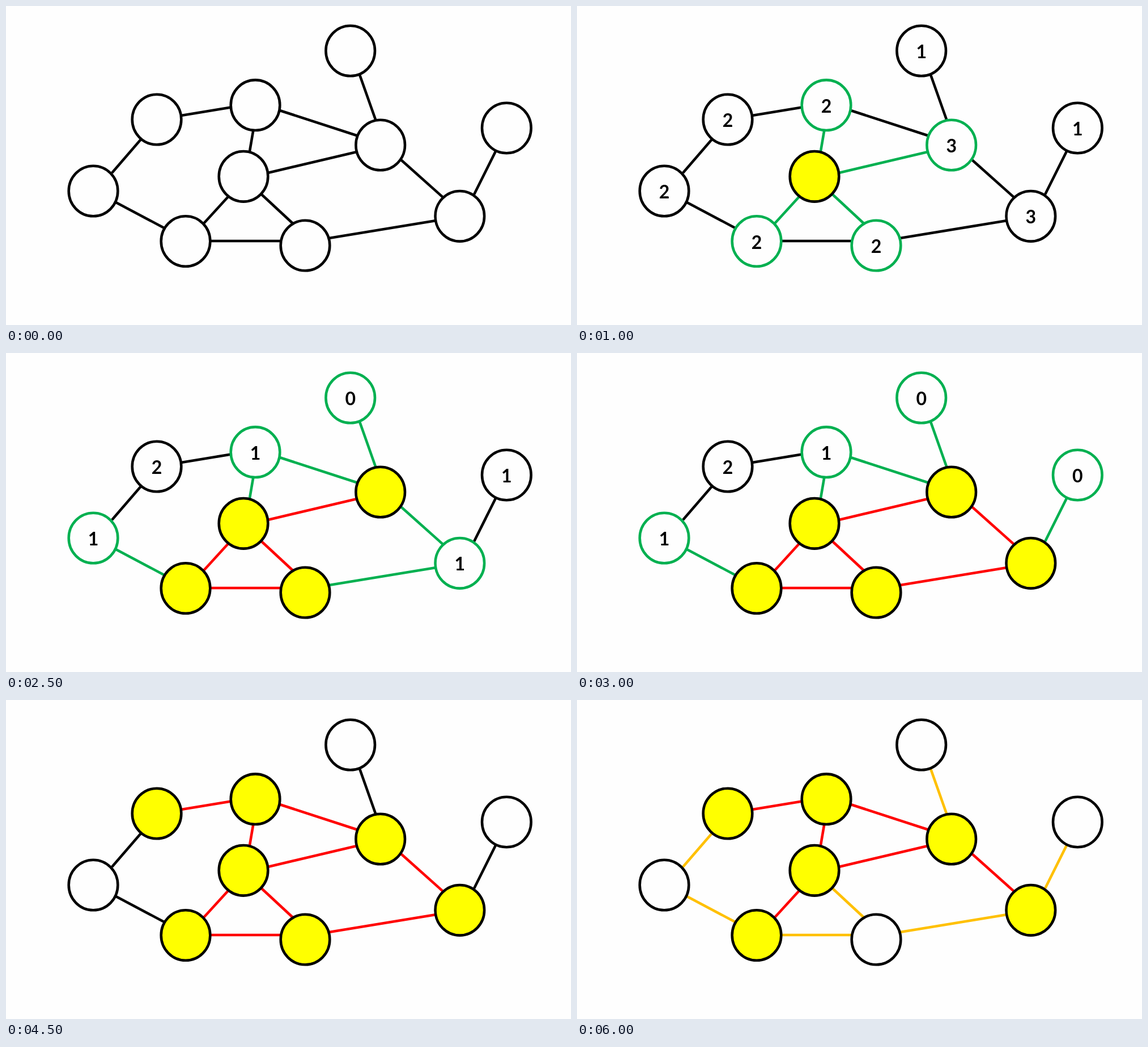
An HTML page for the animation above (8 s loop, 997 by 562 pixels).

```html
<!DOCTYPE html>
<html lang="en">
<head>
<meta charset="utf-8">
<title>Graph cover</title>
<style>
  html, body { margin: 0; width: 100%; height: 100%; overflow: hidden; background: #fefefe; }
  svg { display: block; width: 100%; height: 100%; }
  line, ellipse { stroke-width: 4.6; }
  text { font: 700 32px Lato, Carlito, sans-serif; text-anchor: middle; }
</style>
</head>
<body>
<svg viewBox="0 0 997 562"></svg>
<script>
const BLACK = '#000', GREEN = '#00b050', RED = '#f00', ORANGE = '#ffc000';
const YELLOW = '#ff0', WHITE = '#fefefe';
const LOOP = 8000;

const nodes = {
  A: [266, 200], B: [440, 174.7], C: [419, 300.3], D: [154, 326], E: [317, 414.5],
  F: [528, 422], G: [660.7, 245], H: [800.8, 370.3], I: [607.7, 79], J: [883.3, 215]
};

const edges = [
  ['AB', 309, 193, 397, 178.5], ['AD', 238, 235, 187, 294], ['DE', 194, 346, 279, 391],
  ['EC', 349, 383, 392, 336], ['EF', 360, 414, 486, 414], ['CF', 451, 332, 506, 383],
  ['CB', 430, 256, 436.5, 218], ['CG', 462, 294, 619, 257], ['BG', 483, 184, 620, 228.5],
  ['GI', 652, 200, 624, 121], ['GH', 697, 271, 771, 337], ['HF', 570, 409, 759, 378],
  ['HJ', 826, 332, 864, 256]
];

// counts: which nodes show their number of unpicked neighbours
const steps = [
  { at: 0, picked: '', counts: 'none' },
  { at: 500, picked: '', counts: 'open', marked: 'G' },
  { at: 1000, picked: 'C', counts: 'open' },
  { at: 1500, picked: 'CG', counts: 'open' },
  { at: 2000, picked: 'CGF', counts: 'open' },
  { at: 2500, picked: 'CGFE', counts: 'open' },
  { at: 3000, picked: 'CGFEH', counts: 'open' },
  { at: 3500, picked: 'CGFEHB', counts: 'open' },
  { at: 4000, picked: 'CGFEHBA', counts: 'open' },
  { at: 4500, picked: 'CGFEHBA', counts: 'none', cross: BLACK },
  { at: 5500, picked: 'CGFEHBA', counts: 'picked' },
  { at: 6000, picked: 'CGEHBA', counts: 'none', cross: ORANGE }
];

const svg = document.querySelector('svg');

function add(tag, attrs) {
  const el = document.createElementNS('http://www.w3.org/2000/svg', tag);
  for (const key in attrs) el.setAttribute(key, attrs[key]);
  return svg.appendChild(el);
}

const lines = edges.map(([, x1, y1, x2, y2]) => add('line', { x1, y1, x2, y2 }));
const shapes = Object.entries(nodes).map(([id, [x, y]]) => ({
  id,
  ring: add('ellipse', { cx: x, cy: y, rx: 43.3, ry: 44.3 }),
  label: add('text', { x, y: y + 13 }),
  neighbours: edges.filter(([ends]) => ends.includes(id)).map(([ends]) => ends.replace(id, ''))
}));

function show({ picked, counts, marked = '', cross = GREEN }) {
  const isPicked = id => picked.includes(id);

  edges.forEach(([ends], i) => {
    const hits = [...ends].filter(isPicked).length;
    lines[i].setAttribute('stroke', [BLACK, cross, RED][hits]);
  });

  for (const { id, ring, label, neighbours } of shapes) {
    const chosen = isPicked(id);
    const touched = !chosen && cross === GREEN && neighbours.some(isPicked);
    ring.setAttribute('fill', chosen ? YELLOW : WHITE);
    ring.setAttribute('stroke', touched || marked.includes(id) ? GREEN : BLACK);
    const counted = counts === (chosen ? 'picked' : 'open');
    label.textContent = counted ? neighbours.filter(n => !isPicked(n)).length : '';
  }
}

let current;
function tick() {
  const time = performance.now() % LOOP;
  const step = steps.findLast(s => s.at <= time);
  if (step !== current) show(current = step);
  requestAnimationFrame(tick);
}
tick();
</script>
</body>
</html>
```
